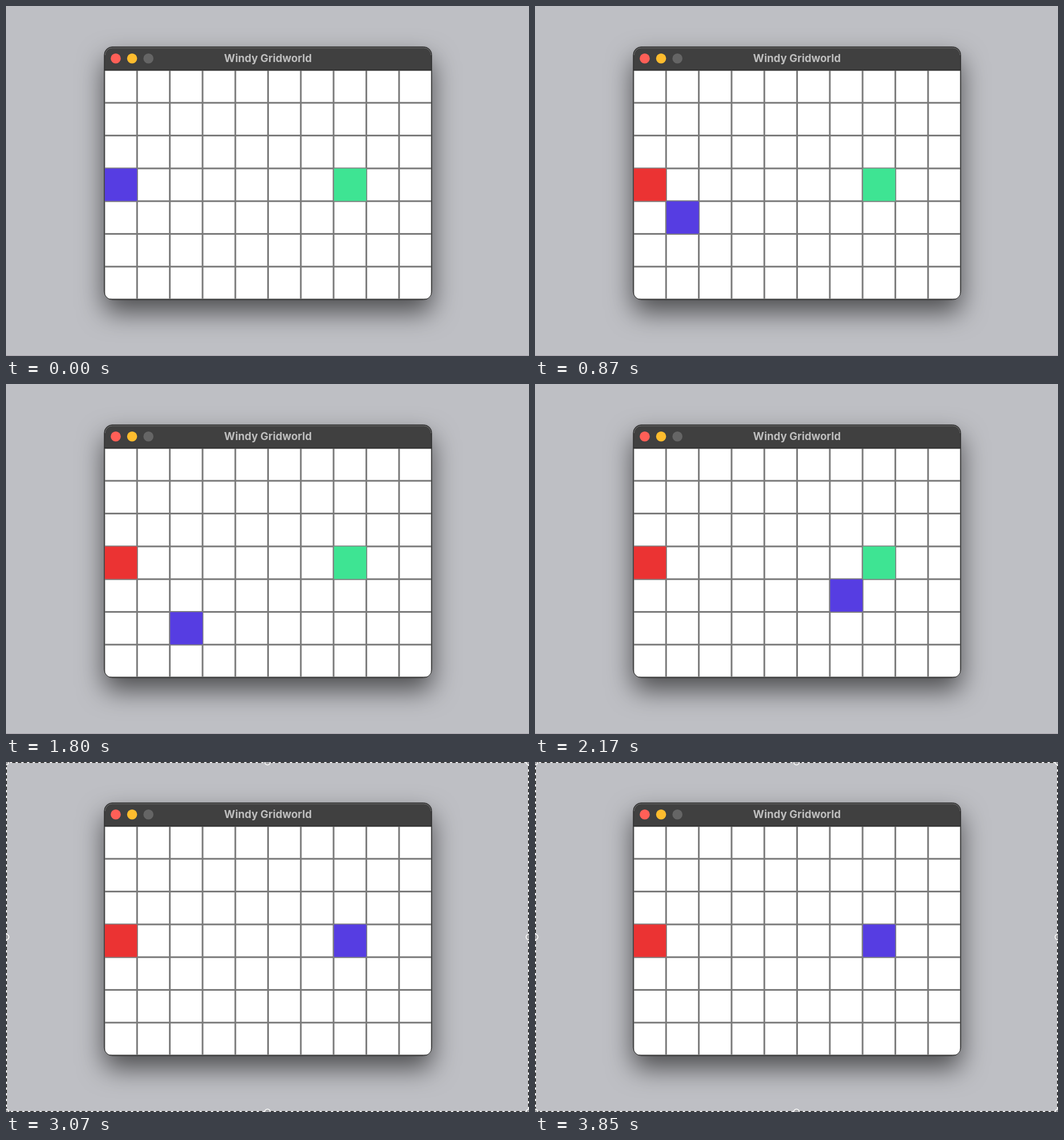
An HTML page for the animation above (3890 ms loop, 915x612 px).

```html
<!DOCTYPE html>
<html lang="en">
<head>
<meta charset="utf-8">
<title>Windy Gridworld</title>
<style>
  html, body { margin: 0; width: 100%; height: 100%; overflow: hidden; background: #bebfc4; }
  .stage { position: relative; width: 915px; height: 612px; overflow: hidden; }
  .shadow {
    position: absolute; left: 172px; top: 71px; width: 573px; height: 442px; border-radius: 14px;
    box-shadow: 0 22px 46px rgba(0, 0, 0, .6), 0 0 2px rgba(0, 0, 0, .3);
  }
  svg { position: absolute; left: 0; top: 0; }
  .title { font: 700 18.6px Inter, "Liberation Sans", sans-serif; fill: #bebebe; text-anchor: middle; }
  .cell { stroke: #808080; stroke-width: 1; }
  .handle { fill: #a5a5a8; stroke: #fff; stroke-width: 1.6; }
</style>
</head>
<body>
<div class="stage">
  <div class="shadow"></div>
  <svg width="915" height="612" viewBox="0 0 915 612">
    <defs>
      <clipPath id="frame"><rect x="172" y="71.5" width="573" height="442" rx="14"/></clipPath>
    </defs>
    <rect y="611" width="915" height="1" fill="#a6a1a9"/>
    <g clip-path="url(#frame)">
      <rect x="172" y="71" width="573" height="443" fill="#fff"/>
      <path id="grid" stroke="#7b7b7b" stroke-width="3"/>
      <g id="cells"></g>
      <rect x="172" y="71" width="573" height="41" fill="#404040"/>
      <rect x="172" y="111.5" width="573" height="1.2" fill="#232323"/>
    </g>
    <path d="M173.2 86a13 13 0 0 1 13-13H730.8a13 13 0 0 1 13 13" fill="none" stroke="#777" stroke-width="1"/>
    <rect x="172" y="71.5" width="572.7" height="442" rx="14" fill="none" stroke="#1c1c1c" stroke-width="1"/>
    <circle cx="192" cy="91.7" r="8.8" fill="#ff5f57"/>
    <circle cx="220.6" cy="91.7" r="8.8" fill="#febc2e"/>
    <circle cx="249.2" cy="91.7" r="8.8" fill="#656565"/>
    <text class="title" x="458.3" y="97.5">Windy Gridworld</text>
    <g id="selection" visibility="hidden">
      <rect x=".7" y=".7" width="913.6" height="610.6" fill="none" stroke="#fff" stroke-width="1.5"/>
      <rect x=".7" y=".7" width="913.6" height="610.6" fill="none" stroke="#111" stroke-width="1.5" stroke-dasharray="6 4"/>
    </g>
  </svg>
</div>
<script>
  const LOOP = 3890, BEAT = 100, SIZE = 57.3, COLS = 10, ROWS = 7;
  const START = [0, 3], GOAL = [7, 3];
  const PATH = [START, [1, 4], [2, 5], [3, 5], [4, 4], [5, 4], [6, 4], GOAL];
  const byId = id => document.getElementById(id);

  function add(parent, tag, attrs) {
    const node = document.createElementNS("http://www.w3.org/2000/svg", tag);
    for (const key in attrs) node.setAttribute(key, attrs[key]);
    return parent.appendChild(node);
  }

  function place(node, [col, row]) {
    node.setAttribute("x", 172.2 + col * SIZE);
    node.setAttribute("y", 111.8 + row * SIZE);
  }

  function addCell(at, fill) {
    const node = add(byId("cells"), "rect", { class: "cell", width: 57.6, height: 57.6, fill });
    place(node, at);
    return node;
  }

  let lines = "";
  for (let c = 0; c <= COLS; c++) lines += `M${172 + c * SIZE} 112V514`;
  for (let r = 0; r <= ROWS; r++) lines += `M172 ${112 + r * SIZE}H745`;
  byId("grid").setAttribute("d", lines);

  addCell(START, "#eb3333");
  addCell(GOAL, "#3ee493");
  const agent = addCell(START, "#563de2");

  const selection = byId("selection");
  for (const x of [0, 457.5, 915])
    for (const y of [0, 306, 612])
      if (x !== 457.5 || y !== 306) add(selection, "circle", { class: "handle", cx: x, cy: y, r: 5 });

  // One move per beat, with a late beat midway and a slightly early last one.
  function stepAt(t) {
    if (t < 1970) return Math.min(19, Math.floor((t + 70) / BEAT));
    if (t >= 3850) return 39;
    return 20 + Math.floor((t - 1970) / BEAT);
  }

  function draw(now) {
    const t = now % LOOP;
    place(agent, PATH[stepAt(t) % PATH.length]);
    selection.setAttribute("visibility", t >= 2230 ? "visible" : "hidden");
  }

  const begin = performance.now();
  function tick() {
    draw(performance.now() - begin);
    requestAnimationFrame(tick);
  }
  tick();
</script>
</body>
</html>
```
